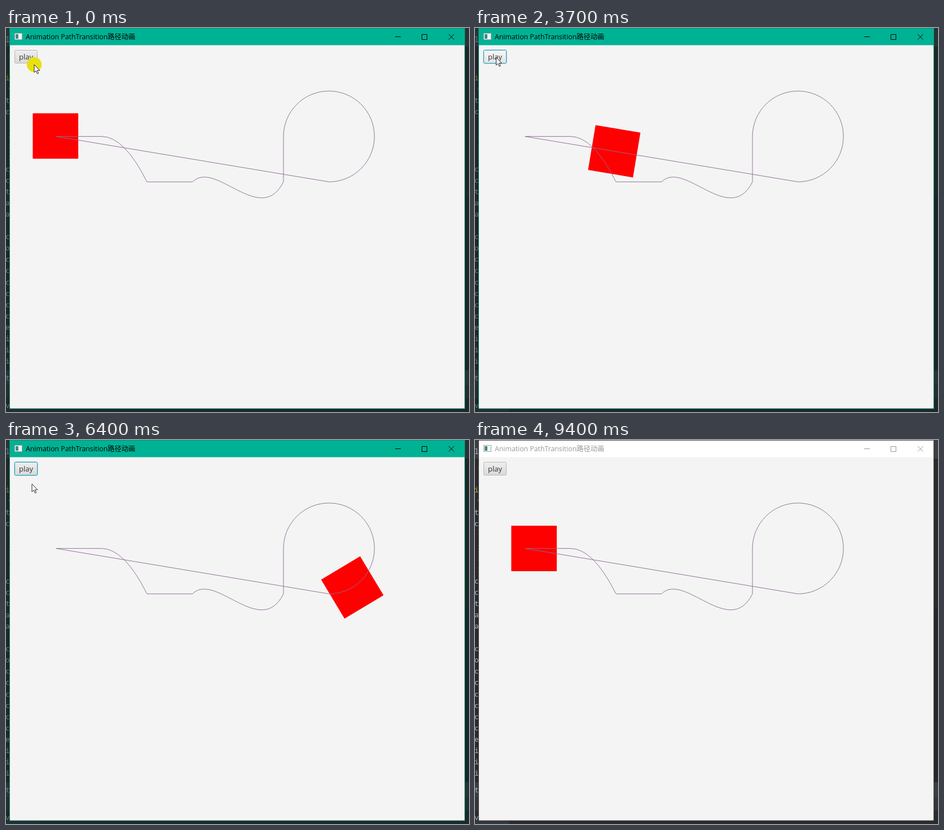
Recreate the animation shown at these times as an HTML page. Size 821 px wide and 682 px high, loop 9.5 s.

```html
<!DOCTYPE html>
<html lang="zh">
<head>
<meta charset="utf-8">
<title>PathTransition</title>
<style>
html, body { margin: 0; width: 100%; height: 100%; overflow: hidden; background: #252a2b; }
svg { display: block; }
text { font-family: "Open Sans", "Noto Sans CJK SC", "Noto Sans CJK", sans-serif; }
#code text { font: 13px "Noto Sans Mono", monospace; }
.shade { fill: #0b2422; opacity: .4; }
.bar { fill: #00b294; }
.edge { fill: none; stroke: #128c79; }
.caption { fill: #000; font-size: 12.3px; }
.controls { fill: none; stroke: #000; }
.inactive .shade { opacity: 0; }
.inactive .bar { fill: #fff; }
.inactive .edge { stroke: #4a4c4e; }
.inactive .caption { fill: #999; }
.inactive .controls { stroke: #999; }
#button rect { fill: url(#face); stroke: #b8b8b8; }
#button.hover rect { fill: url(#bright); }
#button.focus rect { stroke: #2a9fb8; }
#button .glow { fill: none; stroke: none; }
#button.focus .glow { stroke: #a9dbe6; }
</style>
</head>
<body>
<svg id="stage" width="821" height="682" viewBox="0 0 821 682">
  <defs>
    <linearGradient id="face" x2="0" y2="1"><stop stop-color="#efefef"/><stop offset="1" stop-color="#d9d9d9"/></linearGradient>
    <linearGradient id="bright" x2="0" y2="1"><stop stop-color="#f7f7f7"/><stop offset="1" stop-color="#e3e3e3"/></linearGradient>
  </defs>
  <rect width="821" height="682" fill="#2b2b2b"/>
  <path d="M0 0h821v33H0zM0 608h821v26H0z" fill="#3c3f41"/>
  <path d="M0 634h821v24H0zM0 676h60v6H0z" fill="#343739"/>
  <path d="M814 300h7v307h-7z" fill="#252729"/>
  <g id="code"></g>
  <rect class="shade" width="821" height="682"/>

  <rect x="7" y="0" width="807" height="676" fill="#f4f4f4"/>
  <rect class="bar" x="7" y="0" width="807" height="30.5"/>
  <path class="edge" d="M6.5 .5H813.5V676H6.5z"/>
  <rect x="15.5" y="9.5" width="13" height="11" fill="#fff" stroke="#9aa5a5"/>
  <rect x="17" y="11" width="5" height="8" fill="#3d8c86"/>
  <path d="M24 12v7M26.5 12v7" stroke="#ddd"/>
  <text class="caption" x="35" y="20">Animation PathTransition路径动画</text>
  <path class="controls" d="M690 15.5h10M737.5 11.5h9v9h-9zM785 11l9.5 9.5M794.5 11l-9.5 9.5"/>

  <g id="button">
    <rect class="glow" x="14.5" y="38.5" width="42" height="25" rx="3"/>
    <rect x="15.5" y="39.5" width="40" height="23" rx="2"/>
    <text x="23" y="56" font-size="13" fill="#333">play</text>
  </g>
  <rect id="box" x="-40.33" y="-40.33" width="80.66" height="80.66" fill="red"/>
  <path id="track" fill="none" stroke="#8d6c93" stroke-width=".95"/>
  <circle id="halo" cx="50" cy="65" r="13.2" fill="#e8e010"/>
  <path id="cursor" d="M0 0v14l3.2-3 2.4 5.2 2.1-1-2.3-4.9h4.4z" fill="#fff" stroke="#111" stroke-width=".9"/>
</svg>
<script>
const $ = id => document.getElementById(id);
const SVG = 'http://www.w3.org/2000/svg';
const LOOP = 9500, STEP = 100, START = 10, CYCLE = 4558, BLUR_AT = 9300;
const X0 = 88.7, Y0 = 192.6, UNIT = 80.66, ZONE = UNIT / 10;

// Editor text peeking out to the left of the window
const addLine = (text, y, fill = '#a9b7c6', x = -1) => {
  const line = document.createElementNS(SVG, 'text');
  line.textContent = text;
  line.setAttribute('x', x);
  line.setAttribute('y', y + 4.5);
  line.setAttribute('fill', fill);
  $('code').append(line);
};
addLine('la', 20);
addLine('s', 48, '#6a8759', 4);
addLine('ic', 88, '#bbb529');
addLine('v', 108, '#6a8759', 4);
['tt', 'ct'].forEach((s, i) => addLine(s, 128 + 20 * i));
['f', 'r', 'r', 'i'].forEach((s, i) => addLine(s, 169 + 20.2 * i, '#808080', 4));
['ct', 'ct', 'th', 'ac', 'ac', '', 'ch', 'ot', 'ch', 'ch', 'ch', 'ch', 'ch', 'ch', 'er', 'in', 'in', 'in']
  .forEach((s, i) => addLine(s, 250 + 20.1 * i));
addLine('ta', 621);
addLine('va', 670);

// Path pieces; points are in units from the path start
const at = (x, y) => `${X0 + x * UNIT} ${Y0 + y * UNIT} `;
const pieces = [
  [at(0, 0), 'L' + at(1, 0)],
  [at(1, 0), 'Q' + at(1.5, 0) + at(2, 1)],
  [at(2, 1), 'L' + at(3, 1)],
  [at(3, 1), 'C' + at(3.5, .5) + at(4.5, 2) + at(5, 1)],
  [at(5, 1), 'L' + at(5, 0)],
  [at(5, 0), `A${UNIT} ${UNIT} 0 1 1 ` + at(6, 1)],
  [at(6, 1), 'L' + at(0, 0)]
].map(([from, draw]) => {
  const path = document.createElementNS(SVG, 'path');
  path.setAttribute('d', 'M' + from + draw);
  return { path, draw, length: path.getTotalLength() };
});
$('track').setAttribute('d', 'M' + at(0, 0) + pieces.map(p => p.draw).join(''));
const total = pieces.reduce((sum, p) => sum + p.length, 0);

const heading = ({ path, length }, s) => {
  const a = path.getPointAtLength(Math.max(0, s - .5));
  const b = path.getPointAtLength(Math.min(length, s + .5));
  return Math.atan2(b.y - a.y, b.x - a.x) * 180 / Math.PI;
};
const mixAngle = (a, b, k) => a + ((b - a + 540) % 360 - 180) * k;

// Point on the path, with the turn smoothed around the joints
function pose(s) {
  let i = 0;
  while (i < pieces.length - 1 && s > pieces[i].length) s -= pieces[i++].length;
  const piece = pieces[i], count = pieces.length, left = piece.length - s;
  const { x, y } = piece.path.getPointAtLength(s);
  let angle = heading(piece, s);
  if (s < ZONE) {
    const prev = pieces[(i + count - 1) % count];
    angle = mixAngle(heading(prev, prev.length), angle, .5 + s / ZONE / 2);
  } else if (left < ZONE) {
    angle = mixAngle(angle, heading(pieces[(i + 1) % count], 0), .5 - left / ZONE / 2);
  }
  return { x, y, angle };
}

const easeBoth = t => t < .2 ? 3.125 * t * t
  : t > .8 ? 1 - 3.125 * (1 - t) ** 2
  : 1.25 * t - .125;

const mouse = [[0, 50, 65], [100, 37.5, 52], [6050, 37.5, 52], [6400, 46, 78],
  [7000, 65, 200], [7700, 116, 472], [8000, 130, 594], [8250, 140, 682]];
function mouseAt(t) {
  const i = mouse.findIndex(m => m[0] > t);
  if (i < 0) return null;
  const [t0, x0, y0] = mouse[i - 1], [t1, x1, y1] = mouse[i];
  const k = (t - t0) / (t1 - t0);
  return [x0 + (x1 - x0) * k, y0 + (y1 - y0) * k];
}

function render(t) {
  const playing = t >= STEP, active = t < BLUR_AT;
  let spot = { x: 87.8, y: 191.8, angle: 0 };
  if (playing) {
    const u = (t - START) / CYCLE % 2;
    spot = pose(easeBoth(u > 1 ? 2 - u : u) * total);
  }
  $('box').setAttribute('transform', `translate(${spot.x} ${spot.y}) rotate(${spot.angle})`);

  const pointer = mouseAt(t);
  $('cursor').style.display = pointer ? '' : 'none';
  if (pointer) $('cursor').setAttribute('transform', `translate(${pointer})`);
  $('halo').style.display = playing ? 'none' : '';

  $('stage').classList.toggle('inactive', !active);
  $('button').classList.toggle('focus', playing && active);
  $('button').classList.toggle('hover', playing && !!pointer && pointer[1] < 63);
}

function frame() {
  const t = performance.now() % LOOP;
  render(Math.floor(t / STEP) * STEP);
  requestAnimationFrame(frame);
}
frame();
</script>
</body>
</html>
```
